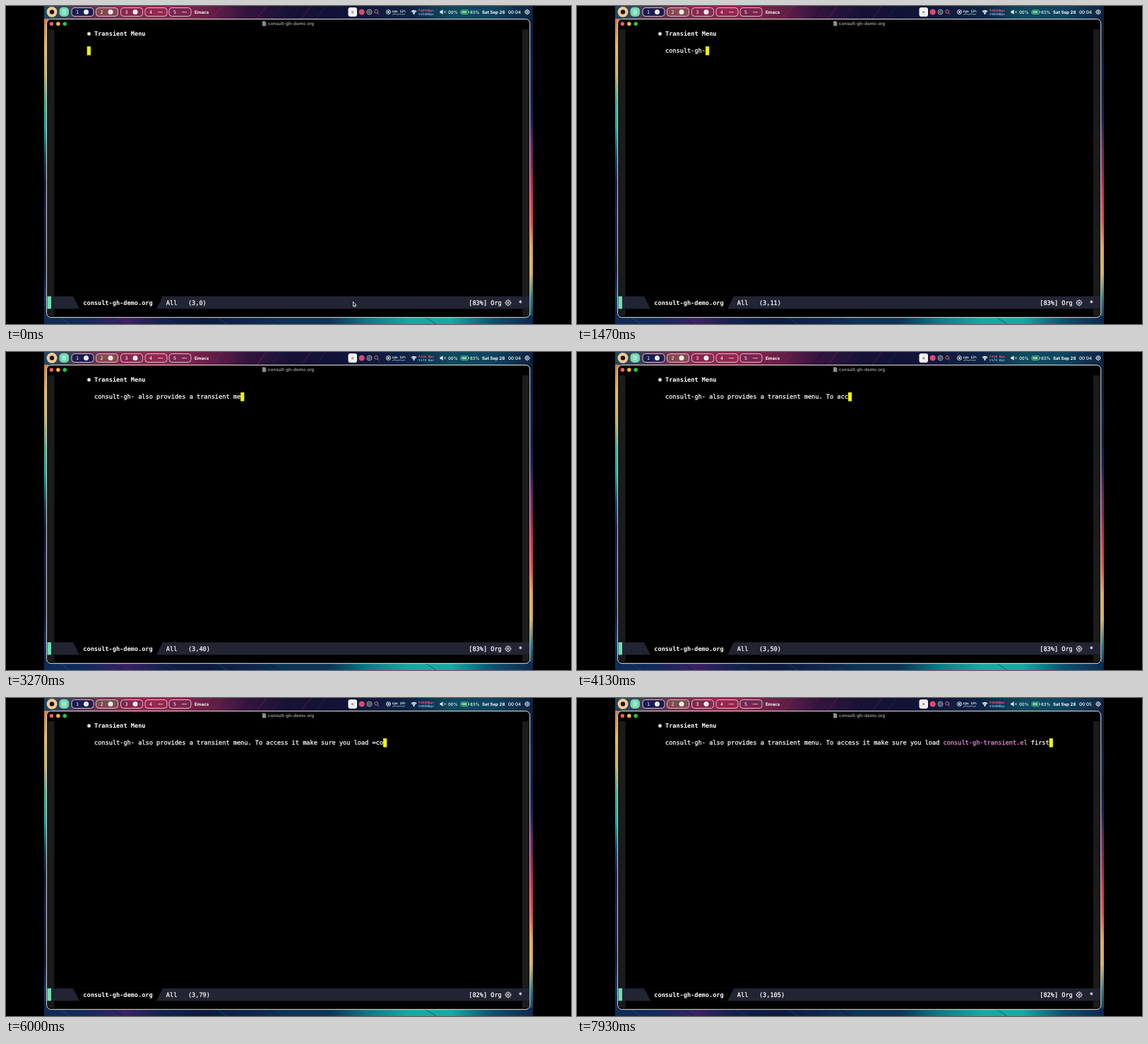
Write an HTML page with a canvas that moves like this. It is 800 by 450 pixels and loops after 8000 ms.

```html
<!DOCTYPE html>
<html lang="en">
<head>
<meta charset="utf-8">
<title>Transient Menu</title>
<style>
html, body { margin: 0; width: 100%; height: 100%; overflow: hidden; background: #000; }
canvas { display: block; }
</style>
</head>
<body>
<canvas id="stage" width="800" height="450"></canvas>
<script>
const c = document.getElementById('stage').getContext('2d');
const MONO = '"DejaVu Sans Mono", monospace', SANS = 'Inter, sans-serif';
const ADV = 5.178, LOOP = 8000;
const LINE = 'consult-gh- also provides a transient menu. To access it make sure you load =consult-gh-transient.el= first';
const OPEN = LINE.indexOf('='), CLOSE = LINE.lastIndexOf('=');

// [time, keys typed]
const KEYS = [[0, 0], [500, 0], [1470, 11], [1730, 14], [2530, 28], [2600, 28], [3400, 43],
  [3540, 43], [4130, 50], [4200, 50], [6000, 79], [6470, 90], [6600, 90], [7070, 96],
  [7400, 101], [7470, 102], [7730, 105], [7800, 105], [7930, 107], [8000, 107]];
// [time, cpu, upload, download]
const STATS = [[0, 12, '007KBps', '014KBps'], [1000, 12, '001KBps', '001KBps'],
  [2000, 14, '013KBps', '004KBps'], [3070, 12, '410 Bps', '174 Bps'],
  [5070, 10, '003KBps', '005KBps'], [6130, 10, '002KBps', '004KBps'],
  [7200, 14, '003KBps', '020KBps']];

function keysAt(t) {
  const i = KEYS.findIndex(k => k[0] > t);
  if (i < 0) return LINE.length;
  const [t0, n0] = KEYS[i - 1], [t1, n1] = KEYS[i];
  return Math.floor(n0 + (n1 - n0) * (t - t0) / (t1 - t0));
}

function text(s, x, y, size, color = '#fff', weight = 400, font = SANS) {
  c.font = `${weight} ${size}px ${font}`;
  c.fillStyle = color;
  c.fillText(s, x, y);
}
// Regular letters get a hairline outline for a medium weight.
function mono(s, x, y, color = '#fff', weight = 400) {
  c.lineWidth = 0.25;
  c.strokeStyle = color;
  [...s].forEach((ch, i) => {
    text(ch, x + i * ADV, y, 8.6, color, weight, MONO);
    if (weight === 400) c.strokeText(ch, x + i * ADV, y);
  });
}
function rect(x, y, w, h, color) {
  c.fillStyle = color;
  c.fillRect(x, y, w, h);
}
function round(x, y, w, h, r, fill, edge) {
  c.beginPath();
  c.roundRect(x, y, w, h, r);
  paint(fill, edge);
}
function dot(x, y, r, fill, edge) {
  c.beginPath();
  c.arc(x, y, r, 0, 7);
  paint(fill, edge);
}
function poly(pts, fill, edge) {
  c.beginPath();
  pts.forEach(p => c.lineTo(...p));
  c.closePath();
  paint(fill, edge);
}
function line(color, ...pts) {
  c.beginPath();
  pts.forEach(p => c.lineTo(...p));
  c.strokeStyle = color;
  c.stroke();
}
function paint(fill, edge) {
  if (fill) { c.fillStyle = fill; c.fill(); }
  if (edge) { c.strokeStyle = edge; c.stroke(); }
}
function strip(x, y, w, h, colors) {
  const g = w > h ? c.createLinearGradient(x, 0, x + w, 0) : c.createLinearGradient(0, y, 0, y + h);
  colors.forEach((k, i) => g.addColorStop(i / (colors.length - 1), k));
  rect(x, y, w, h, g);
}

function wallpaper() {
  strip(54, 0, 692, 20, ['#1c4a62', '#5a3450', '#8a2c50', '#8e2850', '#6a2048', '#34143e',
    '#181236', '#121236', '#0e1a3c', '#0c2446', '#0e4a5e', '#0e4460', '#0c2240']);
  strip(54, 18, 6, 432, ['#d87a48', '#ecb455', '#c8b060', '#3cb090', '#14a8a0', '#0e4c6c',
    '#141c4c', '#20205a', '#102450', '#0e1a44', '#103c70', '#0e1c48']);
  strip(740, 18, 6, 432, ['#0c2040', '#0c1a40', '#0e2250', '#101c48', '#24205a', '#6a2468',
    '#98285e', '#d83058', '#e4504e', '#e8a850', '#dcb458', '#2a7c88', '#0e2c58']);
  strip(54, 439, 692, 11, ['#0e2c58', '#102a5c', '#3a2066', '#10204c', '#0c1a40', '#0e2450',
    '#0c3458', '#0c3458', '#0e7c88', '#14aaa4', '#14aaa4', '#0e5070', '#0c2850']);
  c.lineWidth = 0.8;
  for (let i = 0; i < 9; i++) {
    const x = 292 + i * 21, b = 75 + i * 74;
    line(['#a0305c80', '#30368070', '#0a0c2880'][i % 3], [x, 18], [x + 14, 0]);
    line(['#1c889060', '#06142c90', '#34409060'][i % 3], [b, 440], [b + 16, 450]);
  }
}

function workspace(n, x, fill, icon) {
  c.lineWidth = 0.9;
  round(x, 2.5, 31, 12, 4, fill, '#e8c8d4');
  text(n, x + 6, 11, 6.6, '#fff', 500, MONO);
  if (icon) dot(x + 20.5, 8.5, 3.5, '#eee');
  else line('#e8c8d4', [x + 18, 8.7], [x + 25, 8.7]);
}

function gear(x, y, r) {
  c.lineWidth = 1;
  dot(x, y, r * 0.72, null, '#eee');
  dot(x, y, r * 0.25, null, '#eee');
  for (let a = 0; a < 8; a++) {
    const u = Math.cos(a * Math.PI / 4), v = Math.sin(a * Math.PI / 4);
    line('#eee', [x + u * r * 0.75, y + v * r * 0.75], [x + u * r, y + v * r]);
  }
}

function menuBar(t) {
  const [, cpu, up, down] = STATS.filter(s => s[0] <= t).pop();
  dot(65, 8.4, 7.4, '#f5cb92');
  dot(65, 8.4, 3.2, '#16131c');
  round(75.5, 1.8, 13.5, 13.2, 5, '#72d8ae');
  c.lineWidth = 0.9;
  [6, 8.4, 10.8].forEach(y => line('#e9fff6', [79.5, y], [85, y]));
  workspace('1', 93, '#1b1c50', true);
  workspace('2', 127.5, '#884850', true);
  workspace('3', 162.5, '#8a264e', true);
  workspace('4', 197, '#962850', false);
  workspace('5', 231, '#7c2450', false);
  text('Emacs', 267, 10.8, 6.2, '#fff', 700);

  round(484.5, 2, 12.5, 13, 3, '#f4f4f4');
  dot(490.8, 8.7, 2, '#b9a9a4');
  dot(503.7, 8.5, 4, '#e0486e');
  c.lineWidth = 0.8;
  dot(514.5, 8.5, 3.5, null, '#ddd');
  dot(514.5, 8.5, 1.5, null, '#ddd');
  c.lineWidth = 1;
  dot(524.2, 7.8, 2.4, null, '#f05a80');
  line('#f05a80', [526, 9.6], [528, 11.8]);
  dot(541.5, 8.5, 3, null, '#eee');
  round(540.2, 7.2, 2.6, 2.6, 0.4, '#eee');
  text(`cpu ${cpu}%`, 546.5, 8.6, 4.6, '#eee', 700, MONO);
  c.lineWidth = 0.7;
  line('#ccc', ...Array.from({ length: 10 }, (_, i) => [547 + i * 2, 12.4 - Math.abs(Math.sin(i * 2.3)) * 1.2]));

  c.lineWidth = 1.1;
  [2, 3.7, 5.3].forEach(r => {
    c.beginPath();
    c.arc(577.5, 11.5, r, -2.35, -0.79);
    paint(null, '#fff');
  });
  dot(577.5, 11.2, 0.9, '#fff');
  c.lineWidth = 0.7;
  line('#f05a80', [584.2, 7.5], [585.3, 4.5], [586.4, 7.5]);
  line('#7ab0e0', [584.2, 10], [585.3, 12.8], [586.4, 10]);
  text(up, 587.3, 8, 4.4, '#f05a80', 700, MONO);
  text(down, 587.3, 12.6, 4.4, '#8cb4e4', 700, MONO);

  poly([[614.5, 7], [616, 7], [618.5, 5], [618.5, 12], [616, 10], [614.5, 10]], '#eee');
  line('#eee', [620, 6.8], [623, 10.2]);
  line('#eee', [623, 6.8], [620, 10.2]);
  text('00%', 626, 10.8, 6, '#fff', 500);
  c.lineWidth = 0.8;
  round(644, 5.8, 10.5, 5.6, 1.5, null, '#7fdc9c');
  round(645.2, 7, 7.4, 3.2, 0.6, '#6fe08e');
  rect(655.2, 7.4, 0.9, 2.4, '#7fdc9c');
  text('83%', 657, 10.8, 6, '#fff', 500);
  text('Sat Sep 28', 674, 10.8, 6.2, '#fff', 700);
  text(t < 6740 ? '00:04' : '00:05', 711, 10.8, 6.3, '#fff', 500);
  gear(738, 8.5, 3.8);
}

function editor(t) {
  c.lineWidth = 1;
  round(57.6, 18.5, 684.2, 422.2, 6, '#000', '#e6e2d4');
  ['#ff5f57', '#febc2e', '#28c840'].forEach((k, i) => dot(64.4 + i * 9.4, 25.3, 2.7, k));
  poly([[363, 21.5], [366.5, 21.5], [368.3, 23.3], [368.3, 28.3], [363, 28.3]], '#8c8c8c');
  text('consult-gh-demo.org', 370.8, 27, 6.3, '#a0a0a0', 600);
  [59, 731].forEach(x => {
    rect(x, 33, 9.5, 378, '#1b1b1b');
    rect(x, 428.5, 9.5, 10, '#1b1b1b');
  });

  c.lineWidth = 1;
  dot(117.5, 39.3, 2.4, '#f2f2f2', '#8a8a8a');
  mono('Transient Menu', 125, 42, '#fff', 700);

  const keys = keysAt(t + 5), linked = keys > CLOSE;
  const col = linked ? keys - 2 : keys;
  const x = keys ? 125 + col * ADV : 114.7;
  if (linked) {
    mono(LINE.slice(0, OPEN), 125, 66.3);
    mono(LINE.slice(OPEN + 1, CLOSE), 125 + OPEN * ADV, 66.3, '#f58ae6');
    mono(LINE.slice(CLOSE + 1, keys), 125 + (CLOSE - 1) * ADV, 66.3);
  } else {
    mono(LINE.slice(0, keys), 125, 66.3);
  }
  rect(x, 57.2, 5.2, 12.4, '#f4f400');

  rect(58.6, 410.8, 682.5, 17.7, '#222433');
  rect(58.6, 410.8, 5.4, 17.7, '#70dfb2');
  poly([[95, 410.8], [222, 410.8], [213, 428.5], [104, 428.5]], '#000');
  mono('consult-gh-demo.org', 109.3, 422.8, '#fff', 700);
  mono('All', 226.8, 422.8);
  mono(`(3,${col})`, 257.9, 422.8);
  mono(`[${t < 5130 ? 83 : 82}%] Org`, 655.2, 422.8);
  gear(711, 420, 4.7);
  mono('*', 725.8, 423.4);

  // The pointer hides once typing begins.
  if (!keys) {
    c.lineWidth = 0.8;
    poly([[491.5, 418.5], [491.5, 425.2], [493, 423.9], [494, 426], [495, 425.5],
      [494.1, 423.5], [496, 423.3]], '#111', '#fff');
  }
}

function frame(now) {
  const t = now % LOOP;
  rect(0, 0, 800, 450, '#000');
  c.textRendering = 'geometricPrecision';
  wallpaper();
  menuBar(t);
  editor(t);
}

let start;
function tick(now) {
  start ??= now;
  frame(Math.max(0, now - start));
  requestAnimationFrame(tick);
}
frame(0);
requestAnimationFrame(tick);
</script>
</body>
</html>
```
